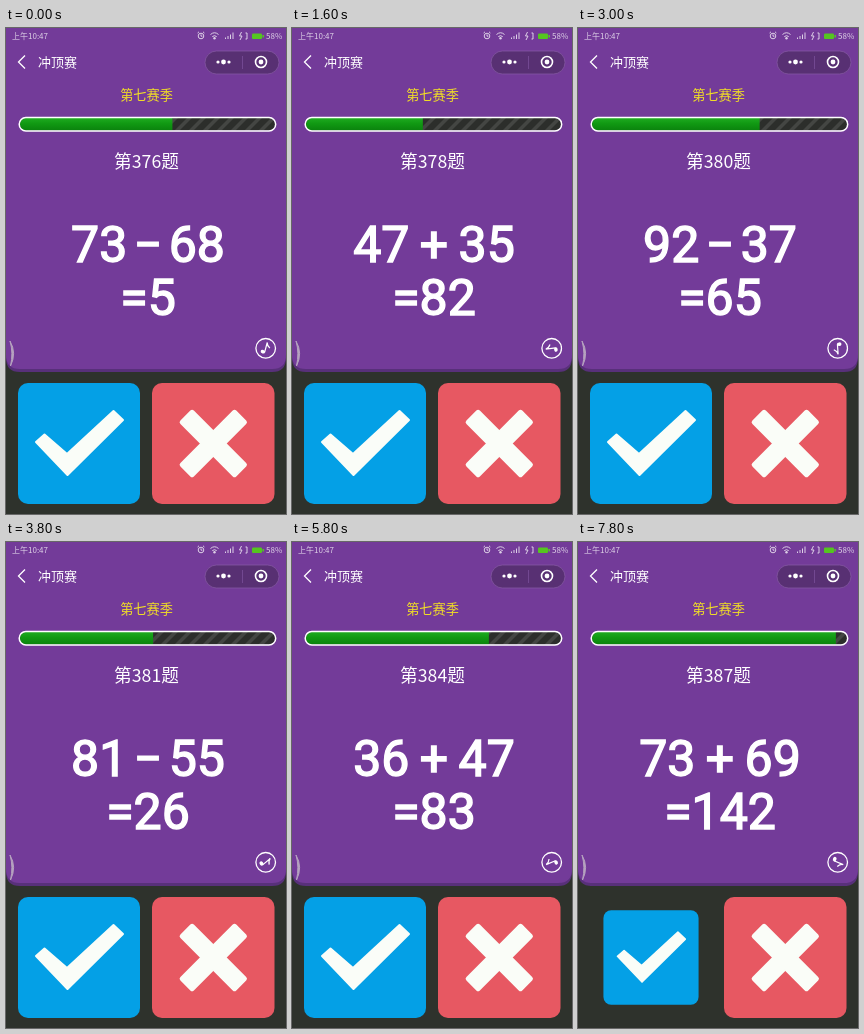
Write an HTML page that moves like this. It is 280x486 px and loops after 8 s.

```html
<!DOCTYPE html>
<html lang="zh">
<head>
<meta charset="utf-8">
<title>速算答题</title>
<style>
  html, body { margin: 0; width: 100%; height: 100%; overflow: hidden; background: #2e322c; }
  svg { display: block; width: 100%; height: 100%; }
  text { font-family: "Noto Sans CJK SC", "Noto Sans CJK", "Noto Sans", sans-serif; fill: #fff; }
  .sum { font-family: Roboto, "Liberation Sans", sans-serif; font-size: 50px; word-spacing: -2px;
         text-anchor: middle; stroke: #fff; stroke-width: 1.5; }
  .mid { text-anchor: middle; }
  .line { fill: none; stroke: #fff; }
  .mark { fill: #fafdf8; stroke: #fafdf8; stroke-width: 2; stroke-linejoin: round; }
  .status { fill: none; stroke: #ddd0e6; }
</style>
</head>
<body>
<svg viewBox="0 0 280 486">
  <defs>
    <pattern id="stripes" width="14" height="14" patternUnits="userSpaceOnUse" patternTransform="translate(14 89) skewX(-45)">
      <rect width="14" height="14" fill="#2c2e2b"/>
      <rect width="5" height="14" fill="#444643"/>
    </pattern>
    <linearGradient id="green" x2="0" y2="1">
      <stop offset="0" stop-color="#22ae24"/>
      <stop offset=".45" stop-color="#119a13"/>
      <stop offset="1" stop-color="#0a810d"/>
    </linearGradient>
    <clipPath id="barClip"><rect x="14" y="90" width="255" height="12.5" rx="6"/></clipPath>
  </defs>

  <rect width="280" height="486" fill="#2e322c"/>
  <path d="M0 0H280V330Q280 344 266 344H14Q0 344 0 330Z" fill="#58307a"/>
  <path d="M0 0H280V327Q280 341 266 341H14Q0 341 0 327Z" fill="#733b99"/>

  <!-- status bar -->
  <text x="6" y="11" font-size="8" style="fill:#ddd0e6">上午10:47</text>
  <g class="status">
    <circle cx="195" cy="8" r="2.8"/>
    <path d="M195 6.4V8.2H196.4M191.6 5L193 3.8M198.4 5L197 3.8"/>
    <path d="M204.5 6.5Q208.5 3 212.5 6.5M206.3 8.6Q208.5 6.8 210.7 8.6"/>
    <path d="M219.5 11V9.5M222 11V8M224.5 11V6.5M227 11V4.5"/>
    <path d="M235.5 4L233.5 8H236L234 12M239.5 5H241V11H239.5"/>
  </g>
  <circle cx="208.5" cy="10.2" r="1.2" fill="#ddd0e6"/>
  <rect x="246" y="5.5" width="10" height="5.5" rx="1" fill="#55c520"/>
  <rect x="256.5" y="7" width="1.5" height="2.5" fill="#55c520"/>
  <text x="260" y="11" font-size="8" style="fill:#ddd0e6">58%</text>

  <!-- title bar -->
  <path class="line" d="M19 27.5L12.5 34L19 40.5" stroke-width="1.3"/>
  <text x="32" y="39" font-size="13" font-weight="500">冲顶赛</text>
  <rect x="199" y="23" width="74" height="23" rx="11.5" fill="#583073" stroke="#8557a2" stroke-width=".8"/>
  <path d="M236.5 28V41" stroke="#79509a" stroke-width=".8"/>
  <g fill="#fff">
    <circle cx="212" cy="34" r="1.6"/><circle cx="217.5" cy="34" r="2.4"/><circle cx="223" cy="34" r="1.6"/>
    <circle cx="255" cy="34" r="2.4"/>
  </g>
  <circle class="line" cx="255" cy="34" r="5.5" stroke-width="1.6"/>

  <text class="mid" x="140.5" y="72" font-size="13.2" style="fill:#f2df25">第七赛季</text>

  <!-- timer -->
  <g clip-path="url(#barClip)">
    <rect x="14" y="89" width="256" height="14" fill="url(#stripes)"/>
    <g id="fill">
      <rect x="-240" y="89" width="254" height="14" fill="url(#green)"/>
    </g>
  </g>
  <rect class="line" x="13.2" y="89.5" width="256.5" height="13.4" rx="6.7" stroke-width="1.5"/>

  <text id="number" class="mid" x="140.5" y="139.5" font-size="17.7"></text>
  <text id="question" class="sum" x="142" y="233.7" xml:space="preserve"></text>
  <text id="result" class="sum" x="142" y="286.5"></text>

  <path d="M4 313Q11 325 4.5 338Q7.5 325 4 313Z" fill="#b5a2bf" stroke="#b5a2bf"/>

  <circle class="line" cx="259.7" cy="320.3" r="9.8" stroke-width="1.3"/>
  <g id="note">
    <ellipse cx="-1.8" cy="4" rx="2.3" ry="1.8" fill="#fff"/>
    <path class="line" d="M0 4V-6Q.5 -3 4 -1.2" stroke-width="1.2"/>
  </g>

  <!-- answer buttons -->
  <g id="yes">
    <rect x="12" y="355" width="122" height="121" rx="10" fill="#04a0e6"/>
    <path class="mark" d="M30 414L38.5 406.5L61 426L107.5 383L117 392L61.5 447Z"/>
  </g>
  <g id="no">
    <rect x="146" y="355" width="122.5" height="121" rx="10" fill="#e75862"/>
    <g class="mark" transform="translate(207.3 415.5) rotate(45)">
      <rect x="-38.5" y="-8.5" width="77" height="17" rx="1.5"/>
      <rect x="-8.5" y="-38.5" width="17" height="77" rx="1.5"/>
    </g>
  </g>
</svg>

<script>
const LOOP = 8000, STEP = 200, LIMIT = 1000, FIRST = 376;

// start time, left operand, operator, right operand, shown result
const rounds = [
  [-400, 73, '-', 68, 5],
  [94, 23, '+', 21, 54],
  [1060, 47, '+', 35, 82],
  [2006, 13, '+', 74, 87],
  [2660, 92, '-', 37, 65],
  [3324, 81, '-', 55, 26],
  [4060, 76, '+', 55, 141],
  [4880, 58, '-', 24, 34],
  [5520, 36, '+', 47, 83],
  [6154, 64, '+', 89, 154],
  [6960, 85, '-', 49, 36],
  [7760, 73, '+', 69, 142]
];

// time, angle of the spinning note
const turns = [[0, 15], [1000, 190], [2400, 360], [3800, 770], [4800, 1080], [6800, 1575], [8000, 1980]];

const el = id => document.getElementById(id);
const isTrue = ([, a, op, b, r]) => (op === '+' ? a + b : a - b) === r;

function angleAt(t) {
  const i = turns.findIndex(([time]) => time > t);
  const [t0, a0] = turns[i - 1], [t1, a1] = turns[i];
  return a0 + (a1 - a0) * (t - t0) / (t1 - t0);
}

function setPressed(id, cx, pressed) {
  el(id).setAttribute('transform', pressed ? `translate(${cx} 415.5) scale(.78) translate(${-cx} -415.5)` : '');
}

let shown = -1;
function showRound(i) {
  if (i === shown) return;
  shown = i;
  const [, a, op, b, r] = rounds[i];
  el('number').textContent = `第${FIRST + i}题`;
  el('question').innerHTML = op === '+'
    ? `${a} + ${b}`
    : `${a} <tspan dx="-4">−</tspan><tspan dx="-4"> ${b}</tspan>`;
  el('result').textContent = '=' + r;
}

function draw(t) {
  let i = rounds.length - 1;
  while (rounds[i][0] > t) i--;
  showRound(i);

  const age = t - rounds[i][0];
  const left = Math.max(0, 1 - age / LIMIT);
  el('fill').setAttribute('transform', `translate(${254 * left} 0)`);
  el('note').setAttribute('transform', `translate(259.7 320.3) rotate(${angleAt(t)})`);

  const next = rounds[i + 1];
  const pressed = i > 0 && age < 110 ? rounds[i - 1]
    : next && next[0] - t < 60 ? rounds[i] : null;
  setPressed('yes', 73, pressed && isTrue(pressed));
  setPressed('no', 207.3, pressed && !isTrue(pressed));
}

const begin = performance.now();
function tick() {
  const t = (performance.now() - begin) % LOOP;
  draw(Math.floor(t / STEP) * STEP);
  requestAnimationFrame(tick);
}
tick();
</script>
</body>
</html>
```
